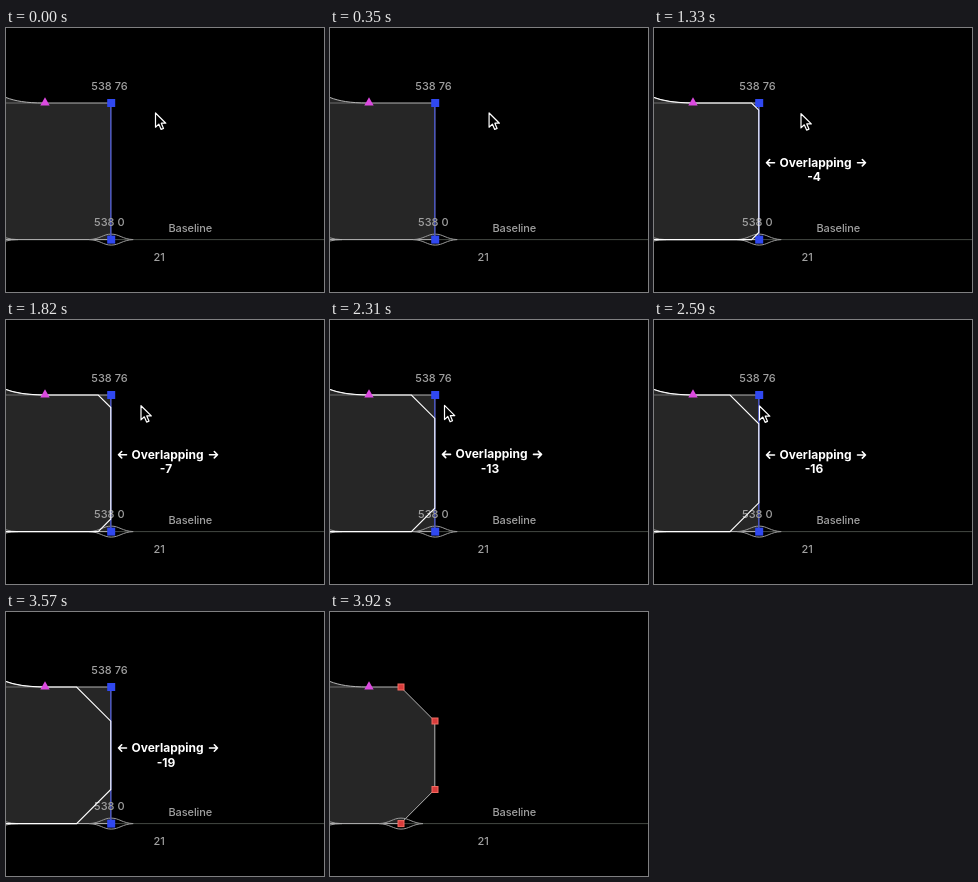
Animation of 318 by 264 pixels, one loop 4270 ms. Source, as an HTML page:

```html
<!DOCTYPE html>
<html lang="en">
<head>
<meta charset="utf-8">
<title>Cutting corners</title>
<style>
  html, body { margin: 0; width: 100%; height: 100%; overflow: hidden; background: #000; }
  svg { display: block; width: 318px; height: 264px; }
  text { font: 500 11px Inter, sans-serif; fill: #a0a0a0; }
  .word { letter-spacing: -.01em; }
  .hint text { font-size: 12px; font-weight: 700; fill: #fff; }
  .hint path { fill: none; stroke: #fff; stroke-width: 1.6; stroke-linecap: round; stroke-linejoin: round; }
  .thin { fill: none; stroke: #999; }
  .node { fill: #3048f0; }
  .cut .node { fill: #d83c3c; stroke: #f46a60; }
  #preview { fill: none; stroke: #fff; stroke-width: 1.1; }
</style>
</head>
<body>
<svg viewBox="0 0 318 264">
  <defs>
    <rect id="square" x="-4" y="-4" width="8" height="8"/>
    <rect id="box" x="-3" y="-3" width="6" height="6"/>
    <path id="lens" class="thin" d="M-22 0C-11-.5-8-5.5 0-5.5S11-.5 22 0C11 .5 8 5.5 0 5.5S-11 .5-22 0Z"/>
  </defs>

  <path d="M0 211.6H318" stroke="#444843"/>
  <path id="fill" fill="#262626"/>
  <path class="thin" d="M0 75H38" stroke-opacity=".6"/>
  <path class="thin" d="M0 209.8Q5 211.6 12 211.6Q5 211.6 0 213"/>
  <path id="outline" fill="none" stroke="#b4b4b4"/>
  <use id="bump" href="#lens"/>

  <g id="before">
    <path d="M104.8 75V211.6" stroke="#3a48c8" stroke-width="1.2"/>
    <use class="node" href="#square" x="105.2" y="75"/>
    <use class="node" href="#square" x="105.2" y="211.6"/>
    <text x="85.3" y="61.5">538 76</text>
    <text x="88" y="198">538 0</text>
  </g>

  <path id="preview"/>
  <path d="M39 69.2L43.7 77.6H34.3Z" fill="#dc4ae0"/>

  <g id="after" class="cut">
    <use class="node" href="#box" x="71" y="75"/>
    <use class="node" href="#box" x="105" y="109"/>
    <use class="node" href="#box" x="105" y="177.5"/>
    <use class="node" href="#box" x="71" y="211.6"/>
  </g>

  <text class="word" x="162.5" y="203.5">Baseline</text>
  <text x="147.5" y="232.5">21</text>

  <g id="hint" class="hint">
    <path d="M120.5 134H112.5M115.7 130.8L112.5 134L115.7 137.2M203.5 134H211.5M208.3 130.8L211.5 134L208.3 137.2"/>
    <text x="125.5" y="138">Overlapping</text>
    <text x="160" y="152.5" id="value" text-anchor="middle">0</text>
  </g>

  <path id="cursor" d="M0 0V14.2L3.3 11.1L5.6 16.4L8 15.4L5.8 10.2H10.3Z" fill="#000" stroke="#fff" stroke-width="1.2" stroke-linejoin="round"/>
</svg>
<script>
const LOOP = 4270, STEP = 70, DRAG = 840, HIDE = 3570, RELEASE = 3780;
const START_X = 161, START_Y = 85, UNITS_PER_PX = 0.28, PX_PER_UNIT = 1.8;
const LEFT = 0, TOP = 75, RIGHT = 104.8, BOTTOM = 211.6;
const $ = id => document.getElementById(id);

// time, x, y of the pointer tip
const track = [
  [0, 149.5, 85], [420, 161, 85], [840, 161, 85], [1330, 147, 85.7], [1820, 135, 85.7],
  [2310, 114.5, 85.4], [2870, 96.5, 86.5], [3010, 95.6, 86.7], [3080, 93, 87], [LOOP, 93, 87]
];

function pointer(t) {
  const i = track.findIndex(k => k[0] > t);
  const a = track[i - 1], b = track[i];
  const p = (t - a[0]) / (b[0] - a[0]);
  return [1, 2].map(n => a[n] + (b[n] - a[n]) * p);
}

function stem(cut) {
  return `M${LEFT} 69.5C9 73 20 ${TOP} 38 ${TOP}H${RIGHT - cut}L${RIGHT} ${TOP + cut}` +
    `V${BOTTOM - cut}L${RIGHT - cut} ${BOTTOM}H${LEFT}`;
}

function show(id, on) {
  $(id).style.display = on ? "" : "none";
}

function move(id, x, y) {
  $(id).setAttribute("transform", `translate(${x} ${y})`);
}

function draw(t) {
  const [x, y] = pointer(t);
  const dragging = t >= DRAG && t < RELEASE;
  const done = t >= RELEASE;
  const amount = t < DRAG ? 0 : Math.round((START_X - x) * UNITS_PER_PX);
  const cut = amount * PX_PER_UNIT;
  const shape = stem(done ? cut : 0);

  $("fill").setAttribute("d", shape + "Z");
  $("outline").setAttribute("d", shape);
  $("preview").setAttribute("d", stem(cut));
  $("value").textContent = amount ? "-" + amount : "0";
  move("bump", done ? 71 : 105.2, BOTTOM);
  move("cursor", x, y);
  move("hint", 0, y - START_Y);

  show("before", !done);
  show("after", done);
  show("preview", dragging);
  show("hint", dragging);
  show("cursor", t < HIDE);
}

const begin = performance.now();
function tick() {
  const t = (performance.now() - begin) % LOOP;
  draw(Math.floor(t / STEP) * STEP);
  requestAnimationFrame(tick);
}
tick();
</script>
</body>
</html>
```
